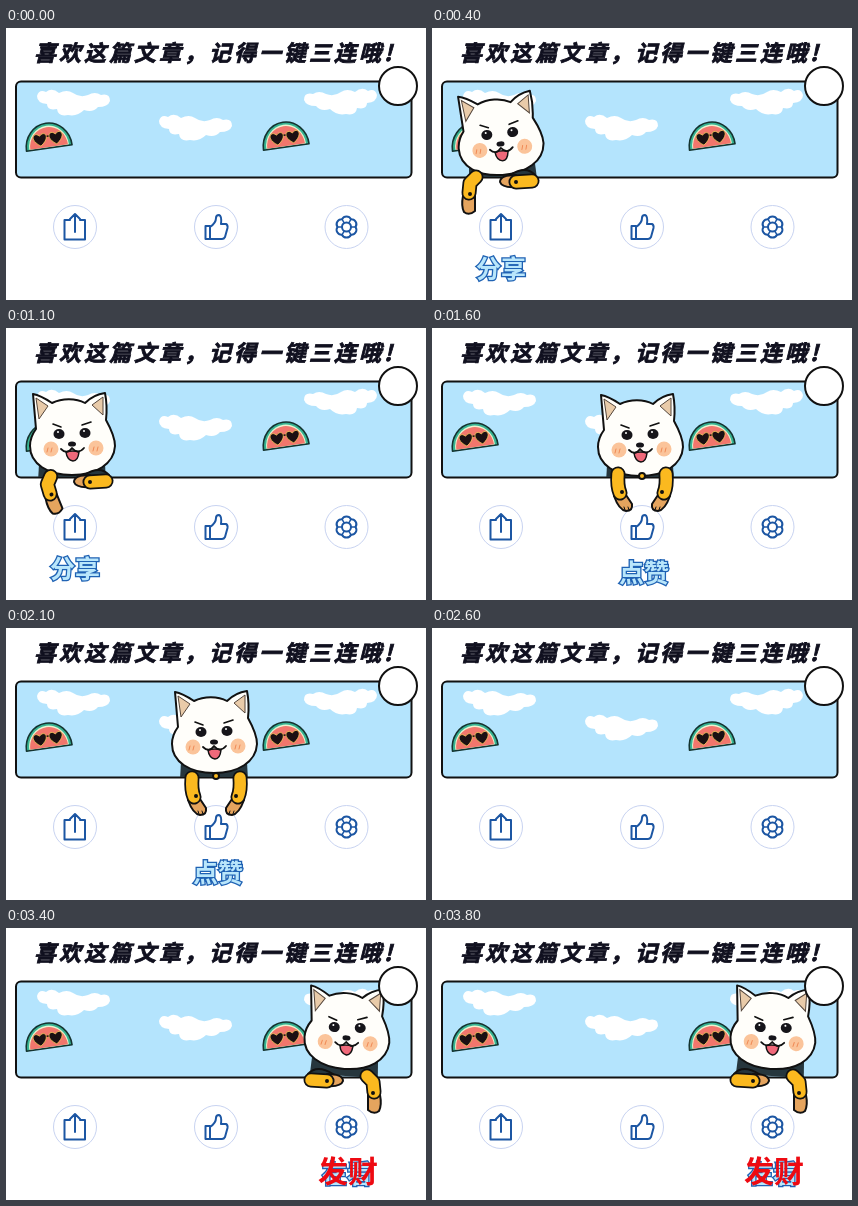
These frames come from a looping animation (420 by 272 pixels, 3900 ms). An HTML page:

```html
<!DOCTYPE html>
<html lang="zh-CN">
<head>
<meta charset="utf-8">
<style>
html, body { margin: 0; width: 100%; height: 100%; overflow: hidden; background: #fff; }
svg { display: block; width: 420px; height: 272px; font-family: "Noto Sans CJK SC", "Noto Sans CJK", sans-serif; font-weight: 900; }
.line { fill: none; stroke-linecap: round; stroke-linejoin: round; }
.icon { stroke: #1c56a3; stroke-width: 2; }
.ink { stroke: #111; stroke-width: 2; }
.title { font-size: 22px; letter-spacing: 3px; font-style: italic; fill: #10101f; stroke: #10101f; stroke-width: .8; }
.caption { font-size: 25px; fill: #b9e6fb; stroke: #1f62b4; stroke-width: 2.6; paint-order: stroke; text-anchor: middle; }
.outer { stroke: #111; stroke-width: 15; }
.sleeve { stroke: #fbb91f; stroke-width: 11.5; }
</style>
</head>
<body>
<svg viewBox="0 0 420 272">
<defs>
  <clipPath id="abovePanelEdge"><rect width="420" height="149"/></clipPath>
  <path id="cloud" fill="#fff" d="M0 7Q2 0 9 3Q15-2 22 4Q30 0 36 4Q43 9 51 6Q58 2 64 6Q73 4 73 12Q71 18 61 18Q56 24 47 21Q40 28 31 26Q21 28 20 20Q10 22 10 15Q0 14 0 7Z"/>
  <path id="heart" fill="#1b1013" stroke="#f4c65c" stroke-width=".8" d="M0 7C-12-1-5-9 0-3C5-9 12-1 0 7Z"/>
  <g id="melon" transform="rotate(-8)">
    <path d="M-23 2A23 25 0 0 1 23 2Z" fill="#36b392" stroke="#14332f" stroke-width="1.6" stroke-linejoin="round"/>
    <path d="M-20 1A20 21.500 0 0 1 20 1Z" fill="#e9f3cf"/>
    <path d="M-19 1A19 20 0 0 1 19 1Z" fill="#f2766c"/>
    <path d="M-8-10H8" stroke="#1b1013" stroke-width="1.5"/>
    <use href="#heart" x="-8" y="-8"/><use href="#heart" x="8" y="-8"/>
  </g>
  <g id="head">
    <path d="M-33 27L-34 45H34L33 27Z" fill="#26363d"/>
    <path class="ink" fill="#fffefa" stroke-linejoin="round" d="M-36-8L-39-43C-33-42-26-38-20-34C-10-39 4-39 13-34C19-40 26-43 33-44C35-34 35-26 34-17C39-8 43 0 43 9C42 27 24 38 0 38C-24 38-42 27-42 9C-42 2-39-4-36-8Z"/>
    <path d="M-33-18L-36-39L-24-31ZM31-22L31-40L20-32Z" fill="#e9cba9" stroke="#54463c"/>
    <circle cx="-21" cy="12" r="7.500" fill="#fbc49a"/><circle cx="24" cy="11" r="7.500" fill="#fbc49a"/>
    <path class="line" stroke="#f08a55" d="M-24 11l-1 4M-20 11l-1 4M22 10l-1 4M26 10l-1 4"/>
    <path class="line" stroke="#111" stroke-width="1.600" d="M-19-13L-11-10M19-15L10-12"/>
    <ellipse cx="-13" cy="-3" rx="5.500" ry="5" fill="#16151a"/><ellipse cx="13" cy="-4" rx="5.500" ry="5" fill="#16151a"/>
    <circle cx="-14" cy="-5" r="1" fill="#fff"/><circle cx="12" cy="-6" r="1" fill="#fff"/>
    <ellipse cx="0" cy="7" rx="4" ry="2.600" fill="#16151a"/>
    <path d="M-6 15Q1 13 7 15Q6 24 1 24Q-5 23-6 15Z" fill="#f0697a" stroke="#111" stroke-width="1.500"/>
    <path class="line" stroke="#111" stroke-width="1.800" d="M-11 12Q-5 18 0 11Q6 18 12 11"/>
  </g>
  <g id="downArm" class="line">
    <path class="ink" fill="#e5a45e" d="M-33 59Q-35 69-32 75Q-27 79-21 74L-21 58Z"/>
    <path class="outer" d="M-20 40L-26 46L-27 56"/><path class="sleeve" d="M-20 40L-26 46L-27 56"/>
    <circle class="ink" cx="-26" cy="57" r="1"/>
  </g>
  <g id="foldedArm" class="line">
    <path class="ink" fill="#26363d" d="M14 38Q30 28 39 38L36 44H14Z"/>
    <path class="ink" fill="#e5a45e" d="M20 38Q4 38 4 45Q6 51 20 50Z"/>
    <path class="outer" d="M36 44L20 45"/><path class="sleeve" d="M36 44L20 45"/>
    <circle class="ink" cx="20" cy="45" r="1"/>
  </g>
  <g id="straightArm" class="line">
    <path class="ink" fill="#e5a45e" d="M-28 65Q-23 79-16 80Q-9 80-10 73L-16 64Z"/>
    <path class="line" stroke="#111" d="M-18 76l1 3M-14 76l1 3"/>
    <path class="outer" d="M-24 43Q-25 55-22 62"/><path class="sleeve" d="M-24 43Q-25 55-22 62"/>
    <circle class="ink" cx="-20" cy="61" r="1"/>
  </g>
</defs>

<text class="title" x="28" y="33">喜欢这篇文章，记得一键三连哦!</text>
<rect x="10" y="53.500" width="395.500" height="96" rx="5" fill="#b4e4fd" class="ink"/>
<use href="#cloud" x="31" y="61"/>
<use href="#cloud" x="153" y="86"/>
<use href="#cloud" transform="translate(371 60) scale(-1 1)"/>
<use href="#melon" x="43" y="118"/>
<use href="#melon" x="280" y="117"/>

<g fill="#fff" stroke="#c8d3f1">
  <circle cx="69" cy="199" r="21.500"/><circle cx="210" cy="199" r="21.500"/><circle cx="340.500" cy="199" r="21.500"/>
</g>
<g class="line icon">
  <path d="M64 192H58.500V211.500H79V192H74M69 204V186M64 191L69 186L74 191"/>
  <path d="M199.500 198H204V211H199.500ZM204 199Q210 195 210 190Q210 187 213 187Q216 188 215 196H220Q222 197 221.500 200L219 209Q218 211 216 211H204"/>
  <g id="flower" transform="translate(340.500 199)">
    <path d="M9 0A5 5 0 0 1 4.500 7.800A5 5 0 0 1-4.500 7.800A5 5 0 0 1-9 0A5 5 0 0 1-4.500-7.800A5 5 0 0 1 4.500-7.800A5 5 0 0 1 9 0Z"/>
    <path stroke-width="1.500" d="M9 0H5M-9 0H-5M4.500 7.800L2.500 4.300M-4.500 7.800L-2.500 4.300M4.500-7.800L2.500-4.300M-4.500-7.800L-2.500-4.300"/>
    <circle r="4.500"/>
  </g>
</g>

<g class="scene">
  <g clip-path="url(#abovePanelEdge)"><use class="head" href="#head"/></g>
  <g class="reach">
    <g transform="translate(64 109)"><use href="#foldedArm"/><use class="paw" href="#downArm"/></g>
    <text class="caption" x="69" y="250">分享</text>
  </g>
</g>
<g class="scene">
  <g clip-path="url(#abovePanelEdge)"><use class="head" href="#head"/></g>
  <g class="reach">
    <g transform="translate(210 107)">
      <circle class="ink" cy="41" r="3" fill="#fbb91f"/>
      <g class="paw"><use href="#straightArm"/><use href="#straightArm" transform="scale(-1 1)"/></g>
    </g>
    <text class="caption" x="212" y="254">点赞</text>
  </g>
</g>
<g class="scene">
  <g clip-path="url(#abovePanelEdge)"><use class="head" href="#head"/></g>
  <g class="reach">
    <g transform="translate(341 108) scale(-1 1)"><use href="#foldedArm"/><use class="paw" href="#downArm"/></g>
    <text class="caption" x="341" y="255">在看</text>
    <text x="342" y="254" font-size="30" text-anchor="middle" fill="#ee0a12">发财</text>
  </g>
</g>
<circle cx="392" cy="58" r="19" fill="#fff" class="ink"/>
</svg>
<script>
const SCENE = 1300, STEP = 100;
const swing = 'rotate(-22 -21 38)', hop = 'translate(0 -4)';
// Head pose while tapping, its shift on the alternate beat, and how the paw moves then
const poses = [
  { x: 68, y: 109, tilt: -4, dx: -2, dy: 0, lift: swing },
  { x: 208, y: 107, tilt: 0, dx: 0, dy: 3, lift: hop },
  { x: 341, y: 103, tilt: 4, dx: 2, dy: 0, lift: swing }
];
const rise = [100, 60, 22];
const scenes = [...document.querySelectorAll('.scene')].map(el => ({
  el,
  head: el.querySelector('.head'),
  reach: el.querySelector('.reach'),
  paw: el.querySelector('.paw')
}));

function draw() {
  const t = performance.now() % (SCENE * scenes.length);
  const current = Math.floor(t / SCENE);
  const step = Math.floor(t % SCENE / STEP);
  const lifted = step % 2;
  scenes.forEach(({ el, head, reach, paw }, i) => {
    const p = poses[i];
    const x = p.x + lifted * p.dx, y = p.y + lifted * p.dy + (rise[step] || 0);
    el.style.display = i === current && step > 0 ? '' : 'none';
    reach.style.display = step < rise.length ? 'none' : '';
    head.setAttribute('transform', `translate(${x} ${y}) rotate(${lifted ? 0 : p.tilt})`);
    paw.setAttribute('transform', lifted ? p.lift : '');
  });
  requestAnimationFrame(draw);
}
draw();
</script>
</body>
</html>
```
